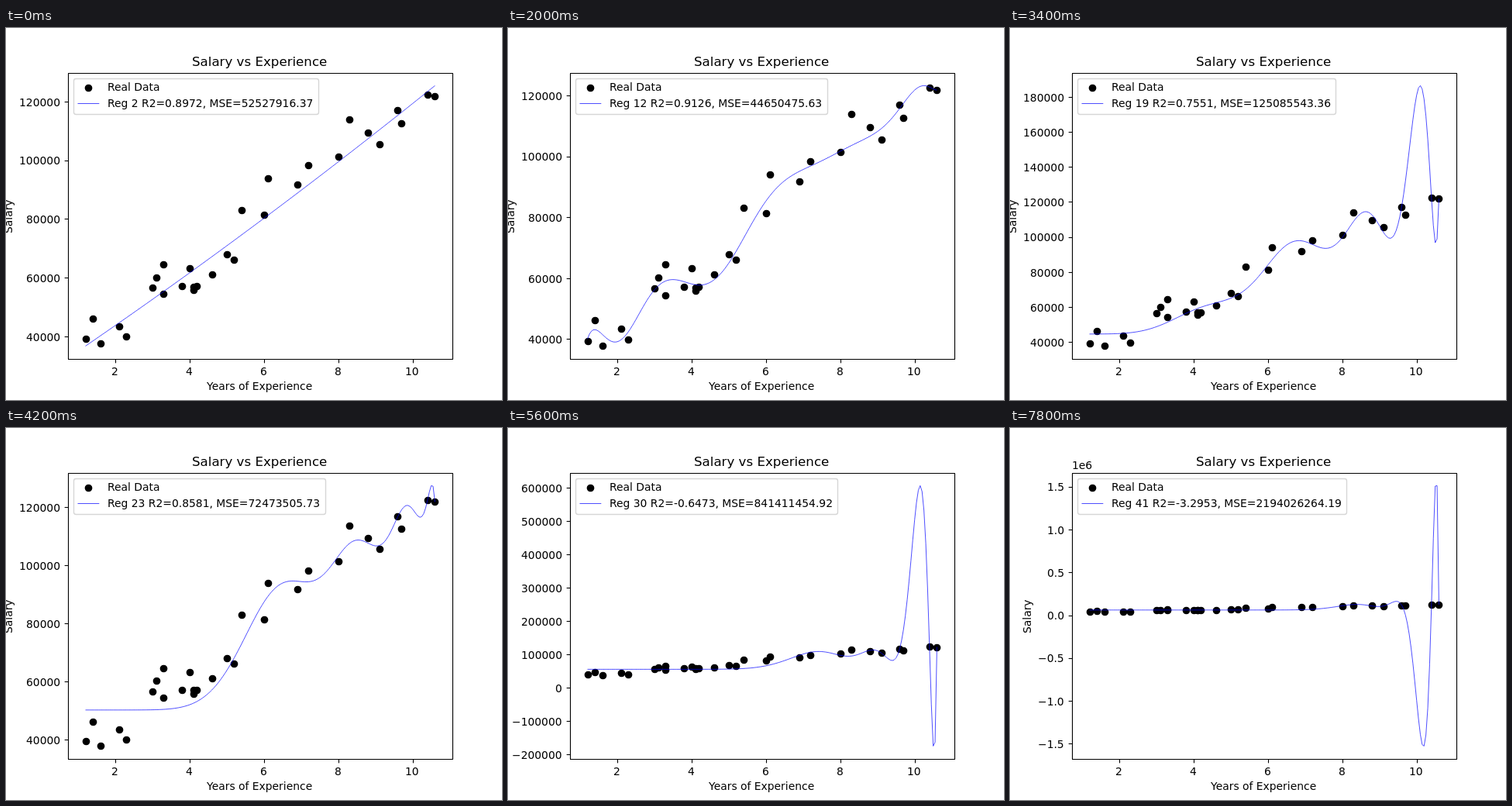
Recreate the animation shown at these times as an HTML page with a canvas. Size 640 px wide and 480 px high, loop 8 s.

```html
<!DOCTYPE html>
<html lang="en">
<head>
<meta charset="utf-8">
<title>Salary vs Experience</title>
<style>
  html, body { margin: 0; width: 100%; height: 100%; overflow: hidden; background: #fff; }
  canvas { display: block; }
</style>
</head>
<body>
<canvas id="chart" width="640" height="480"></canvas>
<script>
const ctx = document.getElementById('chart').getContext('2d');
const STEP_MS = 200, FIRST_DEGREE = 2, STEPS = 40;
const LEFT = 80, RIGHT = 576, TOP = 57.6, BOTTOM = 427.2;
const PT = 100 / 72, FONT = 10 * PT;

// The plotted points: years of experience, salary.
const data = [
  [1.2, 39343], [1.4, 46205], [1.6, 37731], [2.1, 43525], [2.3, 39891], [3, 56642],
  [3.1, 60150], [3.3, 54445], [3.3, 64445], [3.8, 57189], [4, 63218], [4.1, 55794],
  [4.1, 56957], [4.2, 57081], [4.6, 61111], [5, 67938], [5.2, 66029], [5.4, 83088],
  [6, 81363], [6.1, 93940], [6.9, 91738], [7.2, 98273], [8, 101302], [8.3, 113812],
  [8.8, 109431], [9.1, 105582], [9.6, 116969], [9.7, 112635], [10.4, 122391], [10.6, 121872]
];
const xOf = point => point[0], yOf = point => point[1];
const heldOut = [8, 9, 15, 17, 23, 27];
const test = data.filter((_, i) => heldOut.includes(i));
const train = data.filter((_, i) => !heldOut.includes(i));
const grid = Array.from({ length: 189 }, (_, i) => 1.2 + i * 0.05);

const mean = list => list.reduce((sum, v) => sum + v, 0) / list.length;

function dot(a, b, count) {
  let sum = 0;
  for (let i = 0; i < count; i++) sum += a[i] * b[i];
  return sum;
}

// Makes the columns orthogonal over their first `count` rows (one-sided Jacobi).
function orthogonalize(columns, count) {
  for (let sweep = 0, moved = true; moved && sweep < 20; sweep++) {
    moved = false;
    for (let p = 0; p < columns.length - 1; p++) {
      for (let q = p + 1; q < columns.length; q++) {
        const u = columns[p], v = columns[q];
        const a = dot(u, u, count), b = dot(v, v, count), c = dot(u, v, count);
        if (!(Math.abs(c) > 1e-15 * Math.sqrt(a) * Math.sqrt(b))) continue;
        moved = true;
        const z = (b - a) / (2 * c);
        const t = (z < 0 ? -1 : 1) / (Math.abs(z) + Math.hypot(1, z));
        const cos = 1 / Math.hypot(1, t), sin = cos * t;
        for (let i = 0; i < u.length; i++) {
          const ui = u[i], vi = v[i];
          u[i] = cos * ui - sin * vi;
          v[i] = sin * ui + cos * vi;
        }
      }
    }
  }
}

// Least squares with tiny singular values dropped; returns the values at `xs`.
function polynomialFit(points, degree, xs) {
  const count = points.length;
  const allX = points.map(xOf).concat(xs);
  const base = mean(points.map(yOf));
  const target = points.map(p => p[1] - base);
  const columns = [];
  for (let power = degree; power > 0; power--) {
    const column = Float64Array.from(allX, x => x ** power);
    const center = mean(column.subarray(0, count));
    columns.push(column.map(v => v - center));
  }
  orthogonalize(columns, count);
  const sizes = columns.map(c => Math.sqrt(dot(c, c, count)));
  const cutoff = Number.EPSILON * Math.max(...sizes);
  const result = xs.map(() => base);
  columns.forEach((column, k) => {
    if (sizes[k] <= cutoff) return;
    const weight = dot(column, target, count) / sizes[k] ** 2;
    result.forEach((_, i) => { result[i] += weight * column[count + i]; });
  });
  return result;
}

function buildModel(degree) {
  const values = polynomialFit(train, degree, [...grid, ...test.map(xOf)]);
  const curve = values.slice(0, grid.length);
  const predicted = values.slice(grid.length);
  const testMean = mean(test.map(yOf));
  const spread = mean(test.map(p => (p[1] - testMean) ** 2));
  const mse = mean(test.map((p, i) => (p[1] - predicted[i]) ** 2));
  const shownY = [...curve, ...data.map(yOf)];
  const low = Math.min(...shownY), high = Math.max(...shownY);
  const margin = (high - low) * 0.05;
  return {
    curve, low: low - margin, high: high + margin,
    label: `Reg ${degree} R2=${+(1 - mse / spread).toFixed(4)}, MSE=${+mse.toFixed(2)}`
  };
}

const models = {};
const modelFor = degree => models[degree] ||= buildModel(degree);

function yTicks(low, high) {
  const raw = (high - low) / 9, scale = 10 ** Math.floor(Math.log10(raw));
  const step = [1, 2, 2.5, 5, 10].find(s => s * scale >= raw * (1 - 1e-10)) * scale;
  const ticks = [];
  for (let k = Math.ceil(low / step); k * step <= high; k++) ticks.push(k * step);
  const order = Math.floor(Math.log10(Math.max(...ticks.map(Math.abs))) + 1e-9);
  const exponent = order >= 6 ? order : 0;
  const unit = step / 10 ** exponent;
  let digits = 0;
  while (Math.abs(unit * 10 ** digits - Math.round(unit * 10 ** digits)) > 1e-6) digits++;
  const format = v => (v < 0 ? '\u2212' : '') + (Math.abs(v) / 10 ** exponent).toFixed(digits);
  return { ticks, exponent, format };
}

const toX = x => LEFT + (x - 0.73) / 10.34 * (RIGHT - LEFT);
const snap = v => Math.floor(v + 0.5) + 0.5;

// Text starts on a whole pixel; `align` is the share of its width left of x.
function text(string, x, y, align = 0, size = FONT) {
  ctx.font = `${size}px "DejaVu Sans", sans-serif`;
  ctx.fillStyle = '#000';
  const width = ctx.measureText(string).width;
  ctx.fillText(string, Math.floor(x - width * align), y);
  return width;
}

function line(points, color, width) {
  ctx.beginPath();
  points.forEach(([x, y]) => ctx.lineTo(x, y));
  ctx.strokeStyle = color;
  ctx.lineWidth = width;
  ctx.lineJoin = 'round';
  ctx.stroke();
}

function marker(x, y) {
  ctx.beginPath();
  ctx.arc(snap(x), snap(y), 3.5 * PT, 0, 2 * Math.PI);
  ctx.fillStyle = '#000';
  ctx.fill();
}

function drawAxes({ low, high }, toY) {
  const frame = 0.8 * PT, tick = 3.5 * PT;
  ctx.strokeStyle = '#000';
  ctx.lineWidth = frame;
  ctx.strokeRect(snap(LEFT), snap(TOP), RIGHT - LEFT, snap(BOTTOM) - snap(TOP));
  for (let x = 2; x <= 10; x += 2) {
    const px = snap(toX(x));
    line([[px, 427.5], [px, 427.5 + tick]], '#000', frame);
    text(String(x), toX(x), 448, 0.5);
  }
  const { ticks, exponent, format } = yTicks(low, high);
  const labelRight = LEFT - 2 * tick;
  let widest = 0;
  for (const value of ticks) {
    const y = toY(value);
    line([[80.5 - tick, snap(y)], [80.5, snap(y)]], '#000', frame);
    widest = Math.max(widest, text(format(value), labelRight, Math.ceil(y + 5.2), 1));
  }
  if (exponent) text('1e' + exponent, LEFT, 53);
  text('Salary vs Experience', 328, 49, 0.5, 12 * PT);
  text('Years of Experience', 328, 467, 0.5);
  ctx.save();
  ctx.translate(Math.round(labelRight - widest - 9.6), 243);
  ctx.rotate(-Math.PI / 2);
  text('Salary', 0, 0, 0.5);
  ctx.restore();
}

function drawLegend(label) {
  ctx.font = `${FONT}px "DejaVu Sans", sans-serif`;
  const width = Math.ceil(ctx.measureText(label).width + 50);
  ctx.beginPath();
  ctx.roundRect(87.5, 65.5, width, 46, 2.8);
  ctx.fillStyle = 'rgba(255,255,255,0.8)';
  ctx.fill();
  ctx.strokeStyle = 'rgba(204,204,204,0.8)';
  ctx.lineWidth = PT;
  ctx.stroke();
  marker(106.4, 77);
  line([[92.5, 97.5], [120.3, 97.5]], '#00f', 0.5 * PT);
  text('Real Data', 131, 81);
  text(label, 131, 102);
}

function draw(degree) {
  const model = modelFor(degree);
  const toY = y => BOTTOM - (y - model.low) / (model.high - model.low) * (BOTTOM - TOP);
  ctx.fillStyle = '#fff';
  ctx.fillRect(0, 0, 640, 480);
  data.forEach(([x, y]) => marker(toX(x), toY(y)));
  line(grid.map((x, i) => [toX(x), toY(model.curve[i])]), '#00f', 0.5 * PT);
  drawAxes(model, toY);
  drawLegend(model.label);
}

let shown = 0;
function tick() {
  const degree = FIRST_DEGREE + Math.floor(performance.now() / STEP_MS) % STEPS;
  if (degree !== shown) draw(shown = degree);
  requestAnimationFrame(tick);
}
tick();
</script>
</body>
</html>
```
